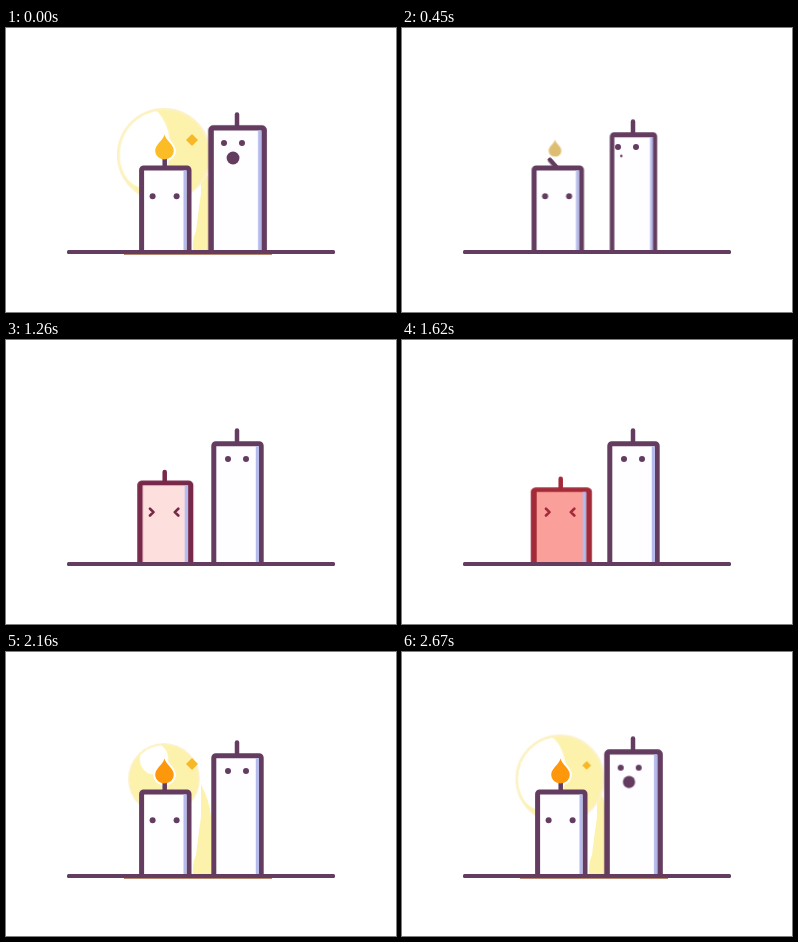
An HTML page that plays this animation: 390x284 px, repeating every 2700 ms.

```html
<!DOCTYPE html>
<html lang="en">
<head>
<meta charset="utf-8">
<title>Two candles</title>
<style>
  html, body { margin: 0; width: 100%; height: 100%; overflow: hidden; background: #fff; }
  svg { display: block; width: 100%; height: 100%; }

  .ink { fill: #633c5f; }
  .wick { stroke: #633c5f; stroke-width: 4.5; stroke-linecap: round; }
  .body { fill: #fefdff; stroke: #633c5f; stroke-width: 5; }
  .shade { fill: #b4bbee; }
  .anim { animation: 2.7s linear infinite; }

  /* Tall candle */
  .tall-body { transform-origin: 231.5px 224px; animation-name: tall-body; }
  .tall-wick { animation-name: tall-wick; }
  .tall-eyes { animation-name: tall-eyes; }
  .blink { animation-name: blink; }
  .mouth { transform-origin: 227px 130px; animation-name: mouth; }

  @keyframes tall-body {
    0%, 9%, 99%, 100% { transform: scale(1.12, 1.033); }
    14%, 16% { transform: scale(.885, .97); }
    20%, 26%, 94% { transform: none; }
    23% { transform: scale(.97, .99); }
  }
  @keyframes tall-wick {
    0%, 9%, 99%, 100% { transform: translateY(-4px); }
    14%, 16% { transform: translateY(3.7px); }
    20%, 26%, 94% { transform: none; }
    23% { transform: translateY(1px); }
  }
  @keyframes tall-eyes {
    0%, 100% { transform: translate(-4px, -4px); }
    4%, 9% { transform: translate(-6px, -4px); }
    14%, 31% { transform: translate(-6px, 0); }
    32%, 94% { transform: none; }
  }
  @keyframes blink {
    0%, 89%, 94%, 100% { opacity: 1; }
    90%, 93% { opacity: 0; }
  }
  @keyframes mouth {
    0%, 100% { transform: none; }
    4%, 8% { transform: translate(-2px, 0) scale(1.5); }
    13% { transform: translate(-8px, -2px) scale(.5); }
    16% { transform: translate(-8px, -2px) scale(.22); }
    21% { transform: translate(-6px, -2px) scale(0); }
    94% { transform: scale(0); animation-timing-function: ease-out; }
  }

  /* Short candle */
  .shake { animation-name: shake; }
  .short-body { transform-origin: 159px 224px; animation-name: squash; }
  .short-body .body { animation-name: blush; }
  .short-head { animation-name: head; }
  .short-wick { transform-origin: 158.7px 140px; animation-name: bend; }
  .short-wick .wick, .squint { animation-name: flush; }
  .dots { animation-name: dots; }
  .squint { fill: none; stroke: #633c5f; stroke-width: 2.6; stroke-linecap: round; stroke-linejoin: round; }
  .squint-show { animation-name: squint; }

  @keyframes shake {
    0%, 13%, 21%, 100% { transform: none; }
    16% { transform: translateX(-5.5px); }
    19% { transform: translateX(3px); }
  }
  @keyframes squash {
    0%, 40%, 75%, 100% { transform: none; }
    46.7% { transform: scale(1.07, .965); }
    60% { transform: scale(1.17, .88); }
    62.5% { transform: scale(.88, 1.12); }
    70% { transform: scale(.96, 1.06); }
  }
  @keyframes head {
    0%, 40%, 75%, 100% { transform: none; }
    46.7% { transform: translateY(3px); }
    60% { transform: translateY(10px); }
    62.5% { transform: translateY(-10px); }
    70% { transform: translateY(-5px); }
  }
  @keyframes blush {
    0%, 40%, 72%, 100% { fill: #fefdff; stroke: #633c5f; }
    46.7% { fill: #fde0dd; stroke: #78294a; }
    60% { fill: #fa9f99; stroke: #a32a38; }
    70% { fill: #fffaf9; stroke: #633c5f; }
  }
  @keyframes flush {
    0%, 40%, 70%, 100% { stroke: #633c5f; }
    46.7% { stroke: #78294a; }
    60% { stroke: #a32a38; }
  }
  @keyframes bend {
    0%, 10%, 29%, 100% { transform: none; }
    15%, 17% { transform: rotate(-42deg); }
    21% { transform: rotate(14deg); }
    25.6% { transform: rotate(-4deg); }
  }
  @keyframes dots {
    0%, 41%, 62.1%, 100% { opacity: 1; }
    41.1%, 62% { opacity: 0; }
  }
  @keyframes squint {
    0%, 41%, 62.1%, 100% { opacity: 0; }
    41.1%, 62% { opacity: 1; }
  }

  /* Flame, glow and smoke */
  .flame { transform-origin: 158.5px 132px; animation-name: flame; }
  .halo { fill: #fff; stroke: #fff; stroke-width: 4; }
  .flicker { animation: flicker 225ms step-end infinite; }
  .glow { transform-origin: 158px 127px; animation-name: glow; }
  .lit { animation-name: lit; }
  .patch { transform-origin: 138px 119px; animation-name: patch; }
  .drip { fill: #ffe48a; animation-name: drip; }
  .smoke { transform-origin: 154px 108px; animation-name: smoke; }
  .spark { fill: #f8b727; }
  .spark-left { transform-origin: 123px 112px; animation-name: spark-left; }
  .spark-right { transform-origin: 186px 112px; animation-name: spark-right; }

  @keyframes flame {
    0%, 9%, 74%, 100% { transform: none; filter: grayscale(0); opacity: 1; }
    14% { transform: translate(-4px, -1px) skewX(8deg) scale(.85); filter: grayscale(.2); opacity: 1; }
    16.7% { transform: translate(-5.5px, -3px) skewX(0deg) scale(.68); filter: grayscale(.5); opacity: 1; }
    18.5% { transform: translate(-7px, -4px) scale(0); filter: grayscale(1); opacity: 0; }
    61% { transform: translate(0, -6px) scale(0); filter: grayscale(0); opacity: 0; }
    64% { transform: translate(0, -8px) skewX(6deg) scale(1.1); filter: grayscale(0); opacity: 1; }
    70% { transform: translate(0, -3px) skewX(-7deg) scale(1.1); filter: grayscale(0); opacity: 1; }
  }
  @keyframes flicker {
    0%, 100% { fill: #fbbc26; }
    50% { fill: #fd980c; }
  }
  @keyframes glow {
    0% { transform: scale(1.02); animation-timing-function: ease-out; }
    3.6%, 74.5%, 87.9% { transform: scale(1.2); animation-timing-function: ease-in-out; }
    11.5%, 62%, 80% { transform: scale(.78); animation-timing-function: ease-in-out; }
    14.8% { transform: scale(1); }
    15%, 61% { transform: scale(0); }
    95% { transform: scale(.78); }
    100% { transform: scale(1.02); }
  }
  @keyframes lit {
    0%, 15%, 61.1%, 100% { opacity: 1; }
    15.1%, 61% { opacity: 0; }
  }
  @keyframes patch {
    0%, 15%, 95%, 100% { transform: none; opacity: 1; }
    15.1%, 76% { transform: translate(7px, -18px) scale(.6, .4); opacity: 0; }
    77%, 80% { transform: translate(7px, -18px) scale(.7, .5); opacity: 1; }
  }
  @keyframes drip {
    0%, 20%, 34.1%, 100% { opacity: 0; }
    20.1%, 34% { opacity: 1; }
  }
  @keyframes smoke {
    0%, 18% { transform: translateY(10px) scale(0); }
    19% { transform: translateY(10px) scale(1); }
    24% { transform: translateY(4px) scale(1); }
    34.4%, 100% { transform: translateY(-20px) scale(0); }
  }
  @keyframes spark-left {
    0%, 66.5%, 77%, 86.5%, 97%, 100% { transform: scale(0); }
    70%, 74%, 90%, 94% { transform: none; }
  }
  @keyframes spark-right {
    0%, 4%, 80%, 84%, 100% { transform: none; }
    7%, 76%, 87%, 96% { transform: translate(-5px, 5px) scale(0); }
  }
</style>
</head>
<body>
<svg viewBox="0 0 390 284">
  <defs>
    <clipPath id="disc"><circle cx="158" cy="127" r="43.5"/></clipPath>
    <path id="teardrop" d="M158.5 106.5 C160 113 167.8 116 167.8 123 a9.3 8.5 0 0 1 -18.6 0 C149.2 116 157 113 158.5 106.5z"/>
  </defs>

  <path class="anim drip" d="M197 150 Q201 158 200 178 L201 204 Q204 212 203 222 H186 Q187 212 189 204 L191 176 Q194 170 194 156 Z"/>
  <g class="anim lit">
    <path fill="#fdf2ac" d="M195 132 Q204 150 205 165 V222 H187 Q186 212 190 203 Q192 185 195 165z"/>
    <g class="anim glow">
      <circle cx="158" cy="127" r="45" fill="#fdf2ac" stroke="#fcf1c9" stroke-width="2"/>
      <g clip-path="url(#disc)">
        <ellipse class="anim patch" cx="138" cy="119" rx="26" ry="40" fill="#fff"/>
      </g>
    </g>
    <path class="anim spark spark-left" d="M123 106 l6 6 -6 6 -6 -6z"/>
    <path class="anim spark spark-right" d="M186 106 l6 6 -6 6 -6 -6z"/>
  </g>

  <circle class="anim smoke" cx="154" cy="108" r="6.25" fill="#969696"/>

  <g class="anim flame"><use href="#teardrop" class="halo"/></g>
  <g class="anim shake">
    <g class="anim short-head">
      <g class="anim short-wick"><path class="anim wick" d="M158.7 139 V129"/></g>
    </g>
    <g class="anim short-body">
      <rect class="anim body" x="135.6" y="139.9" width="47.4" height="86" rx="2"/>
      <rect class="shade" x="177.5" y="142.4" width="3" height="80"/>
    </g>
    <g class="anim dots ink">
      <circle cx="146.6" cy="168.2" r="3"/>
      <circle cx="170.6" cy="168.2" r="3"/>
    </g>
    <g class="anim squint-show">
      <path class="anim squint" d="M144 168.7 l3.5 3.4 -3.5 3.4 M172.3 168.7 l-3.5 3.4 3.5 3.4"/>
    </g>
  </g>
  <g class="anim flame"><use href="#teardrop" class="flicker"/></g>

  <g class="anim tall-wick"><path class="wick" d="M231 103 V90.5"/></g>
  <g class="anim tall-body">
    <rect class="body" x="207.8" y="103.8" width="47.4" height="122" rx="2"/>
    <rect class="shade" x="249.8" y="106.3" width="3" height="116"/>
  </g>
  <g class="anim tall-eyes">
    <g class="anim blink ink">
      <circle cx="222" cy="119" r="3"/>
      <circle cx="240" cy="119" r="3"/>
    </g>
  </g>
  <circle class="anim mouth ink" cx="227" cy="130" r="6.4"/>

  <rect x="61" y="222" width="268" height="4" rx="1.5" class="ink"/>
  <rect x="120" y="226" width="146" height="58" fill="#fff"/>
  <rect class="anim lit" x="118" y="226" width="148" height="1" fill="#b78a72"/>
</svg>
</body>
</html>
```
